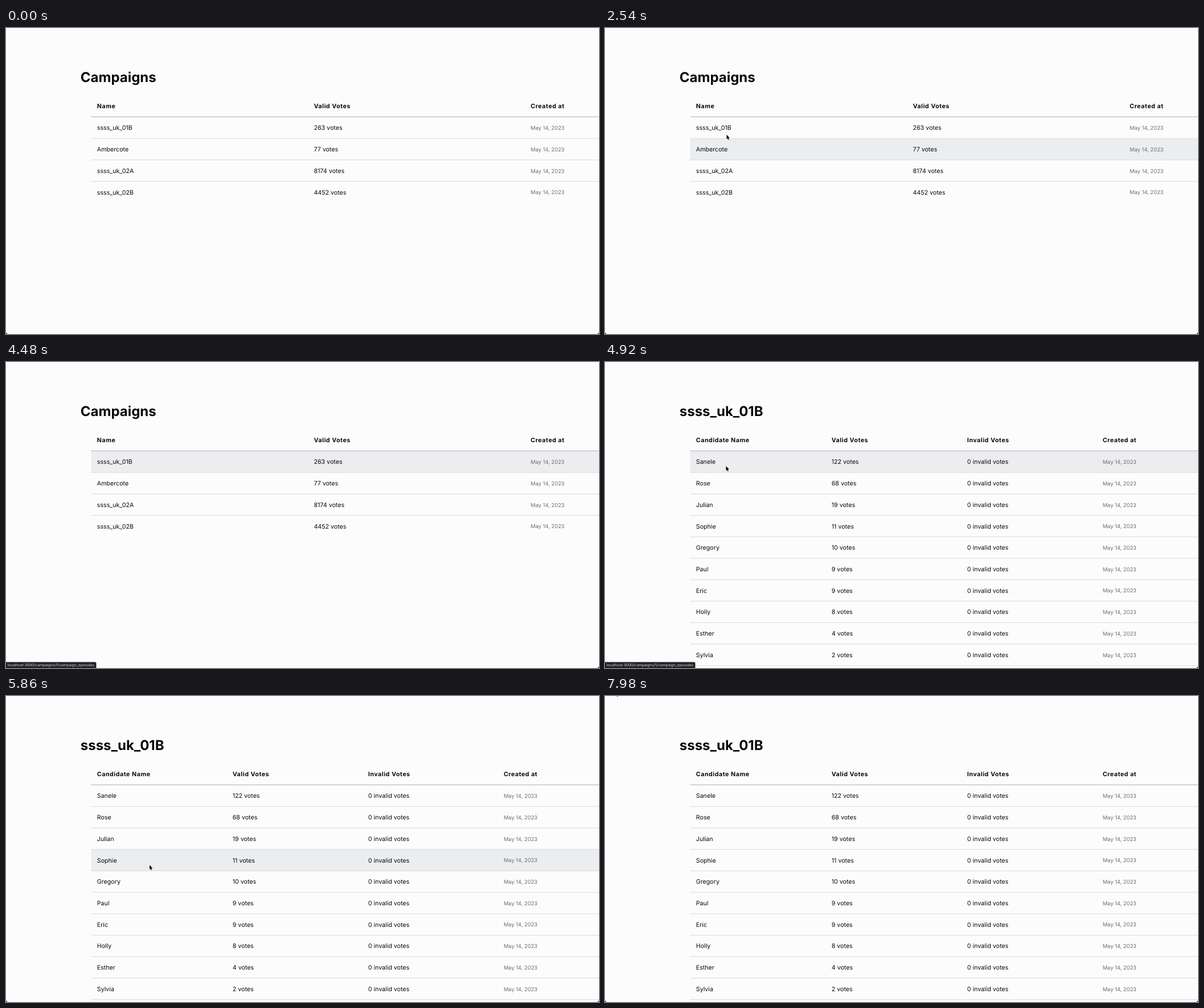
Write an HTML page that moves like this. It is 1041 px wide and 538 px high and loops after 8 s.

```html
<!DOCTYPE html>
<html lang="en">
<head>
<meta charset="utf-8">
<title>Campaigns</title>
<style>
html, body { margin: 0; width: 100%; height: 100%; overflow: hidden; background: #fcfcfc; }
svg { display: block; width: 100%; height: 100%; }
text { font-family: Inter, "Open Sans", sans-serif; font-optical-sizing: none; font-size: 10.67px; fill: #0a0a0c; white-space: pre; text-rendering: geometricPrecision; }
.title { font-size: 24px; font-weight: 700; fill: #08080a; }
.head { font-weight: 700; letter-spacing: .05em; }
.date { font-size: 9.33px; fill: #6c6b7b; }
.url { font-size: 6.6px; fill: #d6d8db; }
</style>
</head>
<body>
<svg id="stage" viewBox="0 0 1041 538"></svg>
<script>
const LOOP = 8000, LAG = 130;
const LEFT = 149.5, TOP = 156.5, PITCH = 37.72;
const ENTER = 40, HOVER_LINK = 2640, PAGE_AT = 4900;
const STATUS_ON = 2720, STATUS_OFF = 5420;
const DATE = "May 14, 2023";

const easeOut = p => k => 1 - (1 - k) ** p;
const easeIn = p => k => k ** p;
const linear = k => k;

// Pointer strokes after the entry point: start, end, x, y, easing
const ENTRY = [950, 8];
const STROKES = [
  [ENTER, 1420, 296.5, 377, easeOut(2.5)],
  [1840, 2540, 213.5, 187.5, linear],
  [HOVER_LINK, 2720, 210, 176, linear],
  [PAGE_AT, 5500, 252, 297, easeOut(1.7)],
  [5860, 6280, 127, 149.5, easeIn(1.5)],
  [6280, 6740, 62, 33, easeOut(2)],
  [6840, 7500, 18.5, -8, easeOut(2)]
];

const votes = n => n + " votes";
const PAGES = [
  {
    title: "Campaigns",
    heads: ["Name", "Valid Votes", "Created at"],
    step: 380.65,
    rows: Object.entries({ ssss_uk_01B: 263, Ambercote: 77, ssss_uk_02A: 8174, ssss_uk_02B: 4452 })
      .map(([name, n]) => [name, votes(n), DATE])
  },
  {
    title: "ssss_uk_01B",
    heads: ["Candidate Name", "Valid Votes", "Invalid Votes", "Created at"],
    step: 237.95,
    more: true,
    rows: Object.entries({
      Sanele: 122, Rose: 68, Julian: 19, Sophie: 11, Gregory: 10,
      Paul: 9, Eric: 9, Holly: 8, Esther: 4, Sylvia: 2
    }).map(([name, n]) => [name, votes(n), "0 invalid votes", DATE])
  }
];

const stage = document.getElementById("stage");

function add(parent, tag, attrs, content) {
  const el = document.createElementNS("http://www.w3.org/2000/svg", tag);
  for (const key in attrs) el.setAttribute(key, attrs[key]);
  if (content !== undefined) el.textContent = content;
  parent.appendChild(el);
  return el;
}

function show(el, on) {
  el.setAttribute("visibility", on ? "visible" : "hidden");
}

const lineY = i => TOP + i * PITCH;
const colX = (page, c) => 159.8 + c * page.step;

function rule(parent, y, width, color) {
  add(parent, "rect", { x: LEFT, y: y - width / 2, width: 900, height: width, fill: color });
}

function buildPage(page) {
  const { title, heads, rows, more } = page;
  const g = add(stage, "g", {});
  add(g, "text", { x: 130.8, y: 95.4, class: "title" }, title);
  heads.forEach((h, c) => add(g, "text", { x: colX(page, c), y: 141.4, class: "head" }, h));
  rows.forEach((cells, r) => {
    if (more || r < rows.length - 1) rule(g, lineY(r + 1), 1.1, "#dcdce4");
    cells.forEach((cell, c) => {
      const isDate = cell === DATE;
      add(g, "text", {
        x: colX(page, c),
        y: (isDate ? 179.1 : 179.4) + r * PITCH,
        class: isDate ? "date" : "cell"
      }, cell);
    });
  });
  rule(g, TOP - .3, 1.6, "#cbc9d2");
  return g;
}

add(stage, "rect", { width: 1041, height: 538, fill: "#fcfcfc" });
const hover = add(stage, "rect", { x: LEFT, width: 900, height: PITCH, fill: "#ebedef" });
const groups = PAGES.map(buildPage);

// Rounded window corners
add(stage, "path", { d: "M0 534.5Q.3 537.7 3.5 538H0Z M1041 535Q1040.7 537.7 1038 538H1041Z" });

const status = add(stage, "g", {});
add(status, "path", {
  d: "M-1 527.8H156.5Q158.2 527.8 158.2 529.5V539H-1Z",
  fill: "#1d1f22", stroke: "#4d5054", "stroke-width": .6
});
add(status, "text", { x: 2.6, y: 535.4, class: "url" }, "localhost:3000/campaigns/1/campaign_episodes");

const pointer = add(stage, "path", {
  d: "M0 0V8.1L1.8 6.5L3 9.3L4.3 8.7L3.1 6H5.5Z",
  stroke: "#fff", "stroke-width": .9, "paint-order": "stroke", "stroke-linejoin": "round"
});

function pointAt(t) {
  let [x, y] = ENTRY;
  for (const [t0, t1, x1, y1, ease] of STROKES) {
    if (t <= t0) break;
    const k = ease(Math.min(1, (t - t0) / (t1 - t0)));
    x += (x1 - x) * k;
    y += (y1 - y) * k;
  }
  return [x, y];
}

function draw(t) {
  const page = t < PAGE_AT ? 0 : 1;
  groups.forEach((g, i) => show(g, i === page));

  const [x, y] = pointAt(t);
  pointer.setAttribute("transform", `translate(${x} ${y})`);
  show(pointer, t >= ENTER && (t < HOVER_LINK || t >= PAGE_AT));

  // The row highlight trails the pointer
  const [hx, hy] = pointAt(t - LAG);
  const row = Math.floor((hy - TOP) / PITCH);
  hover.setAttribute("y", lineY(row));
  show(hover, hx >= LEFT && row >= 0 && row < PAGES[page].rows.length);

  show(status, t >= STATUS_ON && t < STATUS_OFF);
}

const start = performance.now();
function tick() {
  draw((performance.now() - start) % LOOP);
  requestAnimationFrame(tick);
}
draw(0);
requestAnimationFrame(tick);
</script>
</body>
</html>
```
